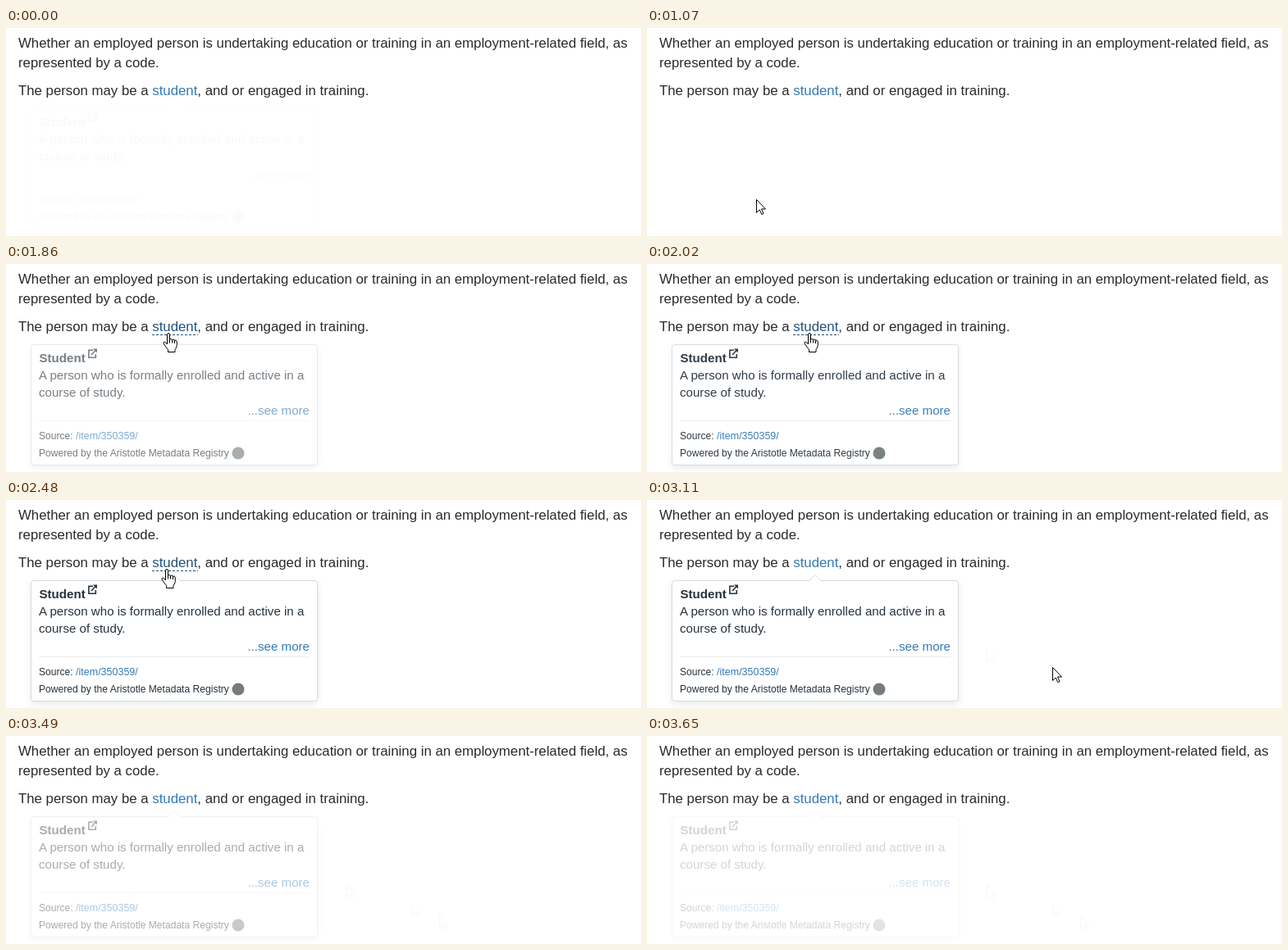
An HTML page for the animation above (3800 ms loop, 774 by 254 pixels).

```html
<!DOCTYPE html>
<html lang="en">
<head>
<meta charset="utf-8">
<title>Glossary popover</title>
<style>
html, body { margin: 0; width: 100%; height: 100%; overflow: hidden; background: #fff; }
svg { display: block; font-family: "Liberation Sans", Arial, sans-serif; }
.body { font-size: 16.8px; fill: #2a2a2a; }
.card { font-size: 15.12px; fill: #26323d; }
.small { font-size: 12.1px; }
.path { font-size: 12.5px; }
.link { fill: #337ab7; }
.panel { fill: #fff; stroke: #d9dadb; filter: drop-shadow(0 3px 4px rgba(0, 8, 16, .09)); }
.cursor { fill: #fff; stroke: #000; stroke-linejoin: round; }

.card, .arrow, .hand, .term, .dash, .trail use { animation: 3800ms step-end infinite; }
.card { animation-name: fade; }
.arrow { animation-name: move; }
.hand { animation-name: hover; }
.term { animation-name: tint; }
.dash { animation-name: show; }
.trail { opacity: .035; }
.trail .a { animation-name: trail-a; }
.trail .b { animation-name: trail-b; }
.trail .c { animation-name: trail-c; }

@keyframes fade {
  0% { opacity: .025; }
  28.15% { opacity: 0; }
  46.84% { opacity: .3; }
  48.94% { opacity: .62; }
  51.05% { opacity: .85; }
  52.89% { opacity: .95; }
  54.99% { opacity: 1; }
  85.78% { opacity: .8; }
  87.63% { opacity: .6; }
  89.73% { opacity: .5; }
  91.84% { opacity: .4; }
  93.94% { opacity: .3; }
  96.05%, 100% { opacity: .2; }
}
@keyframes move {
  0% { opacity: 0; transform: translate(133px, 209px); }
  28.15% { opacity: 1; transform: translate(133px, 209px); }
  30.52% { opacity: 1; transform: translate(137px, 199px); }
  32.36% { opacity: 1; transform: translate(150px, 172px); }
  34.47% { opacity: 1; transform: translate(168px, 138px); }
  36.57% { opacity: 1; transform: translate(184px, 108px); }
  38.68% { opacity: 1; transform: translate(194px, 91px); }
  40.52% { opacity: 1; transform: translate(197px, 86px); }
  46.84% { opacity: 0; transform: translate(197px, 86px); }
  77.63% { opacity: 1; transform: translate(290px, 128px); }
  79.73% { opacity: 1; transform: translate(414px, 181px); }
  81.84% { opacity: 1; transform: translate(494px, 204px); }
  83.68% { opacity: 1; transform: translate(528px, 218px); }
  85.78%, 100% { opacity: 0; transform: translate(528px, 218px); }
}
@keyframes hover {
  0% { opacity: 0; transform: translate(191px, 84px); }
  46.84% { opacity: 1; transform: translate(191px, 84px); }
  63.15% { opacity: 1; transform: translate(190px, 84px); }
  65.26% { opacity: 1; transform: translate(189px, 84px); }
  77.63%, 100% { opacity: 0; transform: translate(189px, 84px); }
}
@keyframes tint {
  0%, 77.63%, 100% { fill: #337ab7; }
  46.84% { fill: #23527c; }
}
@keyframes show {
  0%, 77.63%, 100% { opacity: 0; }
  46.84% { opacity: 1; }
}
@keyframes trail-a { 0% { opacity: 0; } 81.84%, 100% { opacity: 1; } }
@keyframes trail-b { 0% { opacity: 0; } 83.68%, 100% { opacity: 1; } }
@keyframes trail-c { 0% { opacity: 0; } 85.78%, 100% { opacity: 1; } }
</style>
</head>
<body>
<svg width="774" height="254" viewBox="0 0 774 254">
  <defs>
    <path id="pointer" d="M.5 .5V16.5L4.2 13L6.8 18.6L9 17.6L6.5 12H11.5Z"/>
  </defs>

  <g class="body">
    <text x="15" y="24">Whether an employed person is undertaking education or training in an employment-related field, as</text>
    <text x="15" y="48">represented by a code.</text>
    <text x="15" y="82">The person may be a <tspan class="term">student</tspan>, and or engaged in training.</text>
  </g>
  <path class="dash" d="M178 86.5H234" stroke="#23527c" stroke-dasharray="3 2"/>

  <g class="card">
    <rect class="panel" x="30.5" y="98.5" width="349" height="147" rx="3.5"/>
    <path d="M197.5 99L205 91.5L212.5 99" fill="#fff" stroke="#d9dadb"/>
    <path d="M198 99.5H212" stroke="#fff"/>
    <text x="40.5" y="120" font-weight="bold">Student</text>
    <g fill="none" stroke="#26323d" stroke-width="1.6">
      <path d="M106 105.3H100.9V114.2H109.3V110"/>
      <path d="M104 111L109.5 105"/>
      <path d="M106 103.5H111V108.5Z" fill="#26323d" stroke="none"/>
    </g>
    <text x="40" y="141">A person who is formally enrolled and active in a</text>
    <text x="40" y="162">course of study.</text>
    <text class="link" x="370" y="184" text-anchor="end">...see more</text>
    <path d="M40 191.5H370" stroke="#eee"/>
    <text class="small" x="40" y="214">Source: <tspan class="link path">/item/350359/</tspan></text>
    <text class="small" x="40" y="235">Powered by the Aristotle Metadata Registry</text>
    <circle cx="283" cy="231" r="7.5" fill="#747c7c"/>
  </g>

  <g class="cursor trail">
    <use class="a" href="#pointer" x="414" y="181"/>
    <use class="b" href="#pointer" x="494" y="204"/>
    <use class="c" href="#pointer" x="528" y="218"/>
  </g>
  <use class="cursor arrow" href="#pointer"/>
  <g class="cursor hand">
    <path d="M5.5 13V2.2Q5.5 .5 7 .5T8.5 2.2V8Q10 6.8 11.3 8.3Q13 7.3 14.2 9Q17 8.5 17.3 11V15.5Q17 18 15 20.5V23.5H6.5V20.5Q4 17.5 1 13Q.5 10.8 2.5 11.2Q4 11.8 5.5 14Z"/>
    <path d="M8.5 8V12.5M11.5 8.5V12.5M14.5 9.2V13" fill="none"/>
  </g>
</svg>
</body>
</html>
```
